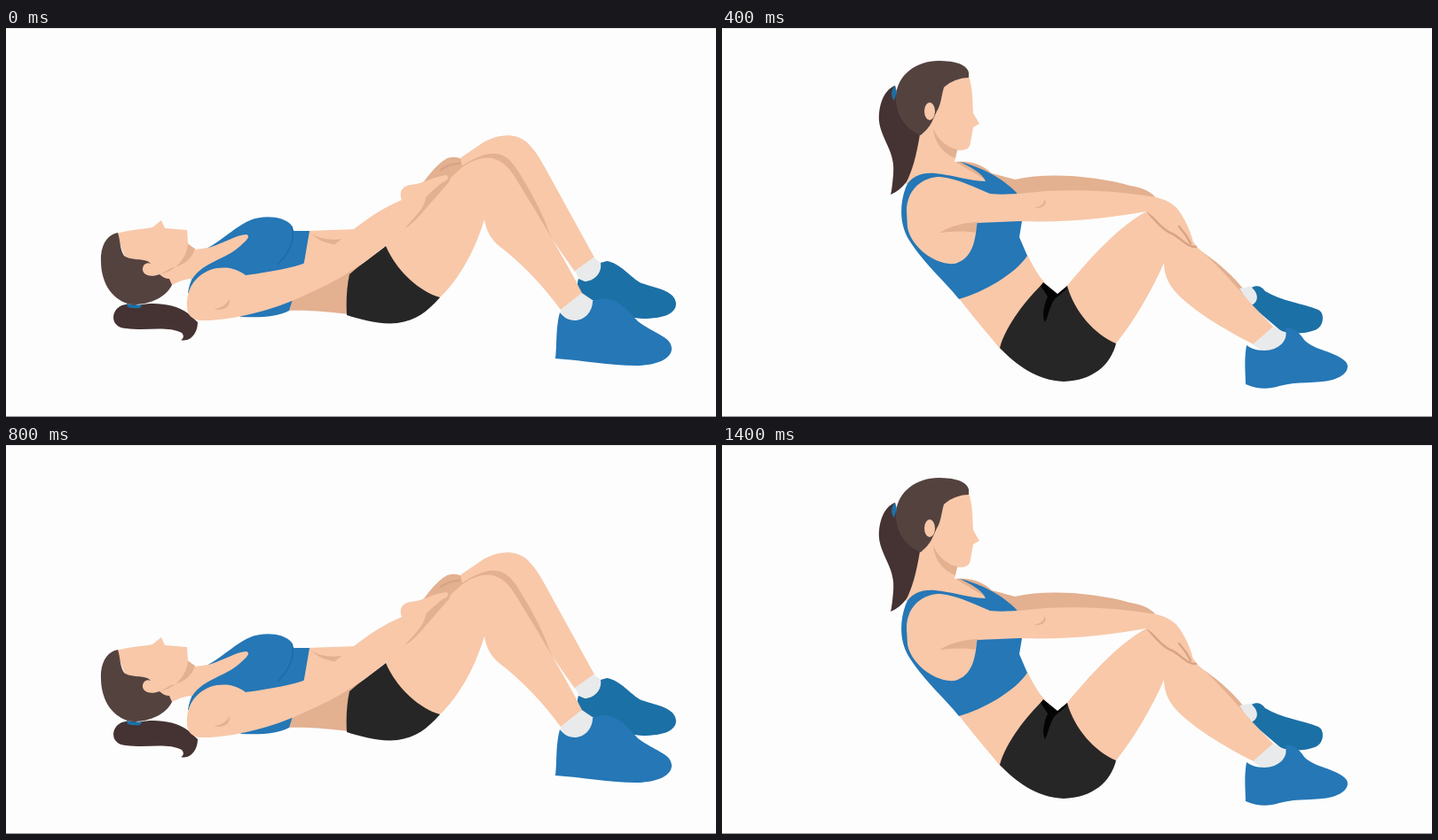
An HTML page that plays this animation: 800 px wide and 439 px high, repeating every 1500 ms.

```html
<!DOCTYPE html>
<html lang="en">
<head>
<meta charset="utf-8">
<title>Sit-up</title>
<style>
html, body { margin: 0; width: 100%; height: 100%; overflow: hidden; background: #fdfdfd; }
svg { display: block; width: 100vw; height: 100vh; }
.skin { fill: #f8c8a9; }
.shade { fill: #e3b090; }
.hair { fill: #54423f; }
.tail { fill: #453233; }
.blue { fill: #2577b6; }
.deep { fill: #1b70a6; }
.short { fill: #272626; }
.sock { fill: #e9eaeb; }
.line { fill: none; stroke: #d9a485; stroke-width: 2.5; stroke-linecap: round; }
</style>
</head>
<body>
<svg viewBox="0 0 800 439" preserveAspectRatio="none">
  <rect width="800" height="439" fill="#fdfdfd"/>
  <rect width="800" height="1" fill="#e4e4e4"/>
  <rect y="438" width="800" height="1" fill="#999"/>

  <g id="lying">
    <!-- far leg -->
    <path class="skin" d="M495 162L513 146L535 131C550 121 573 116 588 130C597 139 602 148 607 157L663 259L641 275C634 265 622 248 611 232L570 170Z"/>
    <path class="shade" d="M478 190L512 157C525 148 540 140 553 142C567 144 574 156 584 173C596 193 605 211 611 228L618 244L590 206L550 160Z"/>
    <path class="sock" d="M641 274L662 259L673 267C671 280 660 288 648 287Z"/>
    <path class="deep" d="M645 283C642 291 646 297 650 302C665 308 690 327 717 328C742 328 755 322 755 311C754 297 735 294 716 288C704 282 692 265 677 263L670 265C672 277 662 286 652 286Z"/>
    <!-- torso -->
    <path class="skin" d="M338 229L396 227L420 240L386 290L330 290Z"/>
    <path class="shade" d="M344 232C356 240 372 240 390 236L374 245C360 243 351 239 344 232Z"/>
    <path class="shade" d="M320 300L400 264L386 323C365 321 345 318 316 319Z"/>
    <!-- head and top -->
    <path class="tail" d="M124 318C118 326 121 338 135 339C160 342 182 336 198 344C201 347 200 351 197 352C207 355 216 345 216 332L205 322C190 311 165 309 150 313C140 310 129 311 124 318Z"/>
    <path class="blue" d="M226 249C245 238 262 222 275 217C290 211 313 212 322 223L324 229L342 229L336 264L319 319C305 326 288 327 265 326L225 300L205 299C207 284 215 272 226 249Z"/>
    <path fill="none" stroke="#1c6ca6" stroke-width="1.5" d="M322 224C326 239 319 254 306 267"/>
    <path class="skin" d="M124 232C137 228 155 227 165 225L175 217L179 226L204 228L205 243L213 250L228 248C245 243 258 234 271 233C276 235 271 240 264 246C253 256 240 260 228 267C219 272 214 277 210 283C202 283 195 286 187 290L150 300Z"/>
    <path class="shade" d="M174 278C190 274 203 262 205 244L213 249C209 262 199 268 186 271Z"/>
    <path class="hair" d="M126 231C114 233 106 246 107 263C107 286 118 305 137 311C157 315 180 305 187 290L184 283C180 283 176 281 173 278C163 282 153 279 154 271C155 266 159 264 163 266C158 259 140 263 133 257C128 249 129 240 126 231Z"/>
    <path class="deep" d="M136 311Q145 314 154 312L151 316Q144 317 137 315Z"/>
    <!-- near leg -->
    <path class="skin" d="M428 246L450 215L500 162L513 158C525 149 540 144 551 148C565 152 573 167 583 184C601 213 633 267 649 299L625 318C603 288 579 264 558 248C546 239 541 228 539 216C530 246 514 280 488 305L440 290Z"/>
    <path class="shade" d="M450 226C460 219 466 212 471 206L499 174L503 164L474 184Z"/>
    <path class="short" d="M428 246C437 268 461 296 489 304C475 320 462 330 441 333C420 335 400 329 384 324C383 308 384 292 387 278C398 268 415 256 428 246Z"/>
    <path class="sock" d="M625 318L649 299L662 308C662 322 652 331 640 331C632 331 625 325 625 318Z"/>
    <path class="blue" d="M624 321C619 340 621 357 619 373C650 375 680 381 710 381C735 381 751 372 750 361C749 348 730 345 712 331C700 318 690 305 672 305L661 308C661 321 651 330 641 330C633 330 628 326 624 321Z"/>
    <!-- hands and near arm -->
    <path class="shade" d="M466 179C475 169 483 155 497 147C504 145 514 145 513 151L514 157L500 170L472 188Z"/>
    <path class="line" d="M490 160Q500 153 511 153"/>
    <path class="skin" d="M204 315C203 298 210 281 230 273C246 268 260 271 270 279C300 275 335 269 351 259C375 243 405 211 446 194C442 185 447 178 456 177C470 176 480 168 496 166C500 168 498 172 492 174C485 180 478 185 473 191C472 203 460 215 440 235C416 256 390 278 340 300C310 315 260 331 217 330C208 328 204 322 204 315Z"/>
    <path class="shade" d="M234 317C243 316 249 312 252 306C253 314 246 320 234 317Z"/>
  </g>

  <g id="sitting">
    <!-- head and neck -->
    <path class="tail" d="M195 65C182 70 176 88 177 105C179 125 196 140 193 165C192 177 191 184 190 188C204 182 214 169 218 150C221 138 222 128 225 119C207 112 198 90 195 65Z"/>
    <path class="skin" d="M250 64L262 55L278 54C283 70 282 84 283 96L290 108L283 112L280 129C279 137 275 138 265 138L262 151C275 154 290 163 299 174L240 180L207 176C214 162 219 145 223 120L232 90Z"/>
    <path class="shade" d="M238 113C239 130 250 142 263 147L265 137C254 135 243 126 238 113Z"/>
    <path class="hair" d="M196 76C198 52 220 37 244 37C262 37 276 41 278 50L278 56C268 56 256 61 250 67C247 77 247 86 242 94L236 107C232 114 228 117 224 121C204 113 195 95 196 76Z"/>
    <ellipse class="skin" cx="234" cy="94" rx="6" ry="10"/>
    <path class="deep" d="M195 65C190 70 190 78 194 82L197 72Z"/>
    <!-- far arm -->
    <path class="shade" d="M263 151C282 149 296 156 304 164L330 171C370 162 425 168 460 178C475 180 485 186 489 192L330 191Z"/>
    <!-- torso -->
    <path class="skin" d="M267 305L344 256C350 268 356 279 364 288L376 306L315 364C297 342 282 325 267 305Z"/>
    <path class="blue" d="M207 180C212 167 226 163 240 164C260 166 280 173 297 173C293 163 278 156 268 151C290 156 316 169 332 186L338 218L335 236L344 257C330 278 295 298 267 306C250 285 225 263 210 238C200 221 200 199 207 180Z"/>
    <!-- far foot -->
    <path class="shade" d="M530 246C550 257 574 277 587 294L598 314L570 300Z"/>
    <path class="sock" d="M583 294L599 291L605 306L596 314Z"/>
    <path class="deep" d="M597 293C602 290 608 291 612 297C630 308 655 311 672 318C680 322 678 338 668 341C655 346 640 345 630 342L596 313C606 309 604 299 597 293Z"/>
    <!-- near leg -->
    <path class="skin" d="M388 292C420 253 450 222 480 206L515 220L536 248C556 265 578 290 598 313L622 338L599 357C565 340 530 318 513 300C503 290 498 278 498 265C485 295 465 330 444 356L410 350Z"/>
    <path class="short" d="M362 288L378 301L389 291C397 320 420 346 444 356C438 380 418 398 385 399C355 398 331 380 313 361C320 335 344 305 362 288Z"/>
    <path fill="#040404" d="M362 287L378 300L389 291L388 295L377 304C370 309 368 325 364 332C360 325 363 312 367 303L359 291Z"/>
    <path class="sock" d="M598 357L621 337L637 345C639 358 622 367 608 364Z"/>
    <path class="blue" d="M591 358C588 375 590 390 590 402C605 408 615 408 628 404C650 398 670 402 688 397C705 392 709 381 701 375C690 365 668 364 656 352C650 342 640 336 634 339C640 352 627 364 611 364C602 364 595 361 591 358Z"/>
    <!-- near arm -->
    <path class="line" d="M480 208C489 218 497 228 507 232C516 236 523 247 534 247"/>
    <path class="skin" d="M208 207C208 185 222 170 243 168C262 168 285 180 302 187C320 189 345 186 365 184C410 182 450 185 482 190C500 192 510 199 516 208C524 220 530 234 531 244C524 245 517 234 507 230C498 224 490 215 478 207C440 214 390 220 335 218L287 220C286 242 281 261 262 266C240 268 213 247 209 225Z"/>
    <path class="line" d="M515 224Q523 233 528 243"/>
    <path class="shade" d="M245 231C260 222 275 220 288 219L285 231C270 228 257 230 245 231Z"/>
    <path class="shade" d="M351 203C359 202 364 198 363 193C368 198 361 205 351 203Z"/>
  </g>
</svg>
<script>
const LOOP = 1500, HOLD = 400;
const lying = document.getElementById('lying');
const sitting = document.getElementById('sitting');

// The pose alternates every HOLD ms; the last hold is cut short by the loop.
function draw(ms) {
  const up = Math.floor((ms % LOOP) / HOLD) % 2 === 1;
  lying.style.display = up ? 'none' : '';
  sitting.style.display = up ? '' : 'none';
}

const start = performance.now();
function tick(now) {
  draw(Math.max(0, now - start));
  requestAnimationFrame(tick);
}
draw(0);
requestAnimationFrame(tick);
</script>
</body>
</html>
```
